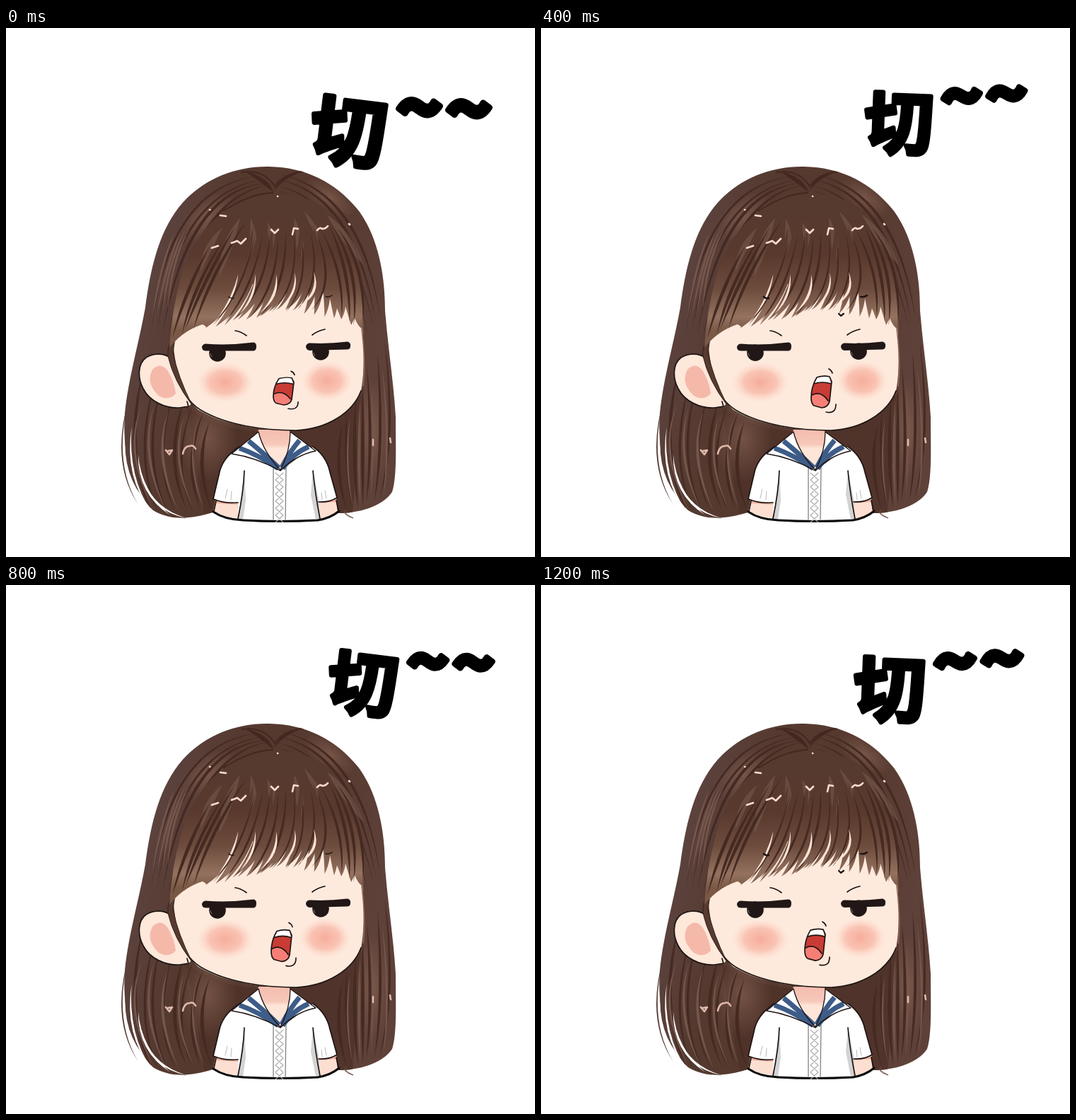
An HTML page that plays this animation: 748 px wide and 748 px high, repeating every 1.4 s.

```html
<!DOCTYPE html>
<html lang="zh">
<head>
<meta charset="utf-8">
<style>
  html, body { margin: 0; height: 100%; overflow: hidden; background: #fff; }
  svg { display: block; width: 100%; height: 100%; }
  .line { fill: none; stroke: #1d1413; stroke-width: 1.7; stroke-linecap: round; stroke-linejoin: round; }
  .word { font: 900 107px "Noto Sans CJK SC", "Noto Sans CJK", sans-serif; text-anchor: middle; stroke: #000; stroke-width: 7; stroke-linejoin: round; }
  .wave { font-size: 111px; stroke-width: 9; }
</style>
</head>
<body>
<svg viewBox="0 0 748 748">
  <defs>
    <linearGradient id="hairFill" x1="0" x2="1" y1="0" y2=".35">
      <stop offset="0" stop-color="#624a49"/><stop offset=".4" stop-color="#54392f"/>
      <stop offset=".75" stop-color="#573a30"/><stop offset="1" stop-color="#5e4139"/>
    </linearGradient>
    <linearGradient id="bangFill" gradientUnits="userSpaceOnUse" x1="0" y1="232" x2="0" y2="428">
      <stop offset="0" stop-color="#553a30"/><stop offset=".45" stop-color="#59392d"/>
      <stop offset=".7" stop-color="#6d4c3d"/><stop offset=".9" stop-color="#94725f"/><stop offset="1" stop-color="#7a5846"/>
    </linearGradient>
    <linearGradient id="neckFill" x1="0" x2="0" y1="0" y2="1">
      <stop offset="0" stop-color="#f4bdae"/><stop offset=".35" stop-color="#f7c8ba"/><stop offset=".45" stop-color="#fee5d8"/>
    </linearGradient>
    <radialGradient id="blush">
      <stop offset="0" stop-color="#f6ac9b"/><stop offset=".55" stop-color="#f8baa9" stop-opacity=".8"/><stop offset="1" stop-color="#fdd9ca" stop-opacity="0"/>
    </radialGradient>
    <radialGradient id="glow">
      <stop offset="0" stop-color="#8d6757" stop-opacity=".6"/><stop offset="1" stop-color="#8d6757" stop-opacity="0"/>
    </radialGradient>
    <path id="hair" d="M372 196C320 195 273 217 244 254C215 292 204 342 197 395C188 445 172 500 168 545C164 600 177 652 208 682C235 698 265 694 295 684L477 686C510 684 536 672 546 656C553 635 551 590 551 550C548 500 540 450 536 400C536 345 525 296 500 260C468 219 425 197 372 196Z"/>
    <clipPath id="hairClip"><use href="#hair"/></clipPath>
  </defs>

  <g id="wisps"></g>
  <use href="#hair" fill="url(#hairFill)"/>
  <g clip-path="url(#hairClip)">
    <path d="M255 535Q300 568 357 570L402 571Q470 562 505 515L490 686H280Z" fill="#4c3027" opacity=".75"/>
    <ellipse cx="285" cy="580" rx="42" ry="62" fill="url(#glow)"/>
    <ellipse cx="518" cy="570" rx="24" ry="75" fill="url(#glow)"/>
    <ellipse cx="285" cy="268" rx="48" ry="26" transform="rotate(-38 285 268)" fill="url(#glow)"/>
    <ellipse cx="458" cy="240" rx="42" ry="20" transform="rotate(35 458 240)" fill="url(#glow)"/>
    <g id="strands"></g>
  </g>
  <g id="gaps"></g>
  <path d="M478 685Q485 690 491 693Q474 688 481 681" fill="none" stroke="#6c5148"/>

  <!-- body -->
  <path d="M357 568H401L404 590L389 627L350 590Z" fill="url(#neckFill)"/>
  <path d="M297 664H329V693Q305 691 293 683ZM442 664H467L469 684Q458 692 443 694Z" fill="#fddfd1"/>
  <path d="M297 670L328 672M443 670L467 668" stroke="#f1b09f" stroke-width="4"/>
  <path d="M330 592Q305 608 301 632L293 666Q310 673 328 671V695Q385 699 444 695L442 670Q458 671 468 664L458 628Q453 605 434 592L388 626Z" fill="#fff"/>
  <path d="M337 626L339 668L335 695H328L333 660ZM434 626L431 660L438 695H444L442 665Z" fill="#d4d3d3"/>
  <path class="line" d="M330 592Q305 608 301 632L293 666Q310 673 328 671M434 592Q453 605 458 628L468 664Q458 671 442 670M337 626Q336 655 328 694M434 626Q437 658 444 694M297 669L294 683M467 668L470 683"/>
  <path d="M293 684Q309 695 335 696Q387 699 441 696Q459 693 471 683" fill="none" stroke="#0c0909" stroke-width="3" stroke-linecap="round"/>
  <path d="M313 652L310 665M319 655L318 667M451 654L453 665M446 657L447 667" class="line" style="stroke:#bbb;stroke-width:1"/>
  <path d="M378 622V695M396 622L395 695" class="line" style="stroke:#777;stroke-width:1.2"/>
  <path id="lace" class="line" style="stroke:#aaa;stroke-width:1.1"/>
  <path d="M357 571L319 602Q353 607 388 626Q409 604 438 598L402 571Q402 598 388 624Q364 600 357 571Z" fill="#fff"/>
  <path d="M330 594Q358 604 385 623M343 584Q364 601 386 622M428 592Q405 602 391 623M415 583Q402 598 390 621" fill="none" stroke="#3d5c88" stroke-width="7"/>
  <path class="line" style="stroke-width:1.3" d="M357 571L319 602Q353 607 388 626Q409 604 438 598L402 571M357 571Q364 600 388 625Q402 598 402 571"/>

  <!-- head -->
  <path id="ear" d="M232 466C222 459 208 460 198 466C186 475 186 495 194 510C203 528 225 538 245 537L258 535L266 528L245 495Z" fill="#fee8da"/>
  <path d="M207 483Q219 471 229 485Q238 500 240 517Q230 528 216 520Q197 502 207 483Z" fill="#f5b9aa"/>
  <path class="line" d="M232 466C222 459 208 460 198 466C186 475 186 495 194 510C203 528 225 538 245 537L258 535L256 528"/>
  <path d="M236 440C239 478 245 515 272 540C310 563 365 569 410 569C453 567 490 545 502 513Q509 478 503 410L470 340H290Z" fill="#feeadd"/>
  <path d="M503 425Q509 475 505 507" fill="none" stroke="#8d6656" stroke-width="1.6"/>
  <path class="line" d="M246 503Q255 527 275 540C312 562 365 569 410 569C453 567 490 545 502 513"/>
  <path d="M240 432Q227 449 229 464Q237 499 263 533Q243 493 236 459Z" fill="#563a30" stroke="#32201b"/>
  <ellipse cx="310" cy="501" rx="41" ry="29" fill="url(#blush)"/>
  <ellipse id="cheek" cx="454" cy="499" rx="37" ry="29" fill="url(#blush)"/>

  <path d="M378 233C310 240 263 290 247 355Q234 400 231 452Q250 428 278 419L284 423Q305 405 325 368Q385 350 448 362Q462 378 474 412Q479 404 480 394L488 420L493 410Q498 423 505 426C511 360 494 305 462 263Q430 235 378 233Z" fill="url(#bangFill)"/>
  <g id="bangs"></g>
  <g clip-path="url(#hairClip)">
    <path d="M378 232Q372 211 337 202Q355 214 378 232Q391 213 421 202Q391 202 378 232Z" fill="#442820"/>
    <path d="M332 204Q365 199 380 224Q391 206 421 203M307 259Q345 234 378 233" fill="none" stroke="#442820" stroke-width="2"/>
  </g>

  <g fill="none" stroke="#f9ddcf" stroke-width="2.6" stroke-linecap="round" stroke-linejoin="round">
    <path d="M288 257h.5M384 238h.2M485 277l1 1M303 265l8 1M291 311l9-3M319 304l8-3 5 4 7-7M375 285l5 5 5-5M405 292l2-9 6 1M440 286q4-5 7-2 5 0 8-4"/>
    <path d="M250 602q2-11 10-11 5-2 8 4M226 597l5 6 4-6-6 1M519 582v8M543 580l1 6" stroke="#dfb9aa"/>
  </g>

  <!-- features -->
  <path class="line" d="M324 428Q332 429 340 435M433 434Q441 428 451 426"/>
  <path id="marks" class="line" d="M315 380Q318 383 322 382M452 380Q457 381 461 378"/>
  <path id="drop" class="line" d="M421 404l3 3 4-3" style="stroke-width:2.2"/>
  <g id="pupils" fill="#211716">
    <circle cx="299" cy="460" r="11.8"/><circle cx="445" cy="458" r="11.8"/>
    <path d="M289 460q0 3 2 5M435 459q0 3 2 5" fill="none" stroke="#665a59" stroke-width="1.4"/>
  </g>
  <path d="M282 446.5Q315 449 350 444.500Q354 445 354 450Q354 456 350 456.500H282Q277 456 277 451Q278 447 282 446.500ZM429 445.500Q455 447 483 443.500Q488 445 487 450Q487 454 483 454.500L429 456Q424 455 424 450Q425 446 429 445.500Z" fill="#211716"/>
  <g id="mouth">
    <path d="M390 494Q399 491 408 493L411 500L408 528Q406 536 397 537L386 534Q382 531 382 523Q382 507 390 494Z" fill="#c83c35"/>
    <path d="M383 519Q396 512 406 527L407 531Q404 537 396 537L386 534Q382 531 383 519Z" fill="#f57f76"/>
    <path d="M390 494Q399 491 408 493L410 503Q398 499 386 503Z" fill="#fff"/>
    <path class="line" d="M390 494Q399 491 408 493L411 500L408 528Q406 536 397 537L386 534Q382 531 382 523Q382 507 390 494ZM386 503Q398 499 410 503M383 519Q396 512 406 527M407 482Q411 484 412 488M403 543Q417 546 417 532"/>
  </g>

  <g id="shout">
    <text class="word" x="-2" y="39" transform="rotate(7)">切</text>
    <text class="word wave" x="98.5" y="7">~</text>
    <text class="word wave" x="168.5" y="9">~</text>
  </g>
</svg>
<script>
const $ = id => document.getElementById(id);

let seed = 7;
const jitter = size => {
  seed = seed * 16807 % 2147483647;
  return (seed / 2147483647 - .5) * size;
};

// One tapered lock: start, bend, end, width
function lock([x, y, cx, cy, u, v, w]) {
  const len = Math.hypot(u - x, v - y), nx = (y - v) / len * w, ny = (u - x) / len * w;
  return `M${x} ${y}Q${cx + nx} ${cy + ny} ${u} ${v}Q${cx - nx} ${cy - ny} ${x} ${y}Z`;
}

// Spreads n locks evenly from one lock to another
function fan(id, color, n, from, to, loose = 6) {
  let d = '';
  for (let i = 0; i < n; i++) {
    d += lock(from.map((a, k) => a + (to[k] - a) * i / (n - 1) + jitter(k < 6 ? loose : a / 2)));
  }
  $(id).insertAdjacentHTML('beforeend', `<path d="${d}" fill="${color}"/>`);
}

const dark = '#452a22', light = '#74564c';

// Crown, then the long hair on both sides
fan('strands', dark, 5, [368, 206, 230, 220, 204, 430, 3], [372, 230, 280, 240, 236, 440, 4]);
fan('strands', dark, 4, [382, 206, 504, 225, 529, 410, 3], [384, 232, 465, 245, 512, 430, 4]);
fan('strands', light, 4, [240, 285, 217, 340, 206, 410, 3], [262, 285, 235, 330, 226, 400, 3]);
fan('strands', dark, 8, [200, 470, 162, 600, 205, 684, 4], [290, 555, 262, 620, 290, 682, 4]);
fan('strands', light, 5, [190, 530, 165, 600, 208, 680, 3], [272, 550, 250, 615, 282, 680, 3]);
fan('strands', dark, 7, [475, 560, 462, 620, 480, 682, 4], [532, 440, 552, 580, 528, 668, 4]);
fan('strands', light, 4, [488, 550, 475, 620, 488, 678, 3], [532, 480, 546, 580, 532, 662, 3]);
fan('wisps', '#5b4038', 4, [172, 520, 147, 612, 186, 674, 2], [180, 580, 170, 665, 255, 693, 4]);
fan('gaps', '#fff', 3, [177, 565, 170, 635, 207, 684, 2.5], [196, 640, 208, 682, 256, 693, 3], 2);

// Fringe: sheen, loose ends over the forehead, fine lines
fan('bangs', 'rgba(122,96,82,.5)', 7, [300, 278, 284, 310, 270, 350, 10], [452, 262, 478, 300, 500, 342, 10], 14);
fan('bangs', 'url(#bangFill)', 11, [350, 280, 336, 375, 284, 422, 12], [424, 280, 428, 370, 396, 399, 12]);
fan('bangs', 'url(#bangFill)', 6, [430, 280, 436, 370, 405, 400, 12], [442, 280, 474, 370, 476, 412, 12]);
fan('bangs', dark, 9, [352, 290, 334, 370, 290, 418, 3], [438, 290, 466, 360, 432, 396, 3], 8);
fan('bangs', dark, 4, [448, 285, 478, 345, 474, 408, 4], [468, 280, 512, 340, 503, 424, 4]);
fan('bangs', dark, 4, [340, 270, 290, 350, 262, 424, 4], [290, 310, 254, 370, 238, 438, 4]);
fan('bangs', '#fde3d4', 5, [327, 350, 323, 382, 301, 409, 3], [436, 344, 446, 376, 415, 393, 4], 4);

let lace = '';
for (let y = 629; y < 690; y += 10) lace += `M381 ${y}l11 10m0-10l-11 10`;
$('lace').setAttribute('d', lace);

// Lettering x, y, scale; mouth shift; glance
const rest = -4;
const poses = [
  [486, 147, 1, rest, 0], [501, 149, .93, -1, 1], [508, 135, .91, 0, 1], [482, 142, .93, rest, 0],
  [506, 140, .92, -7, 0], [497, 128, .98, rest, 0], [495, 148, .95, -9, 1]
];
const move = (id, value) => $(id).setAttribute('transform', value);

function draw(now) {
  const [x, y, size, shift, glance] = poses[Math.floor(now % 1400 / 200)];
  const open = shift === rest ? .87 : 1;
  move('shout', `translate(${x} ${y}) rotate(${glance * -4.8}) scale(${size})`);
  move('mouth', `translate(${shift} ${shift * .65 + 527}) scale(1 ${open}) translate(0 -527)`);
  move('pupils', `translate(${glance * 4} ${glance * -.8})`);
  move('cheek', `translate(${shift < -5 ? -3 : 0} 0)`);
  $('marks').style.strokeWidth = glance ? 2.6 : 1.5;
  $('drop').style.opacity = glance;
  requestAnimationFrame(draw);
}
draw(performance.now());
</script>
</body>
</html>
```
